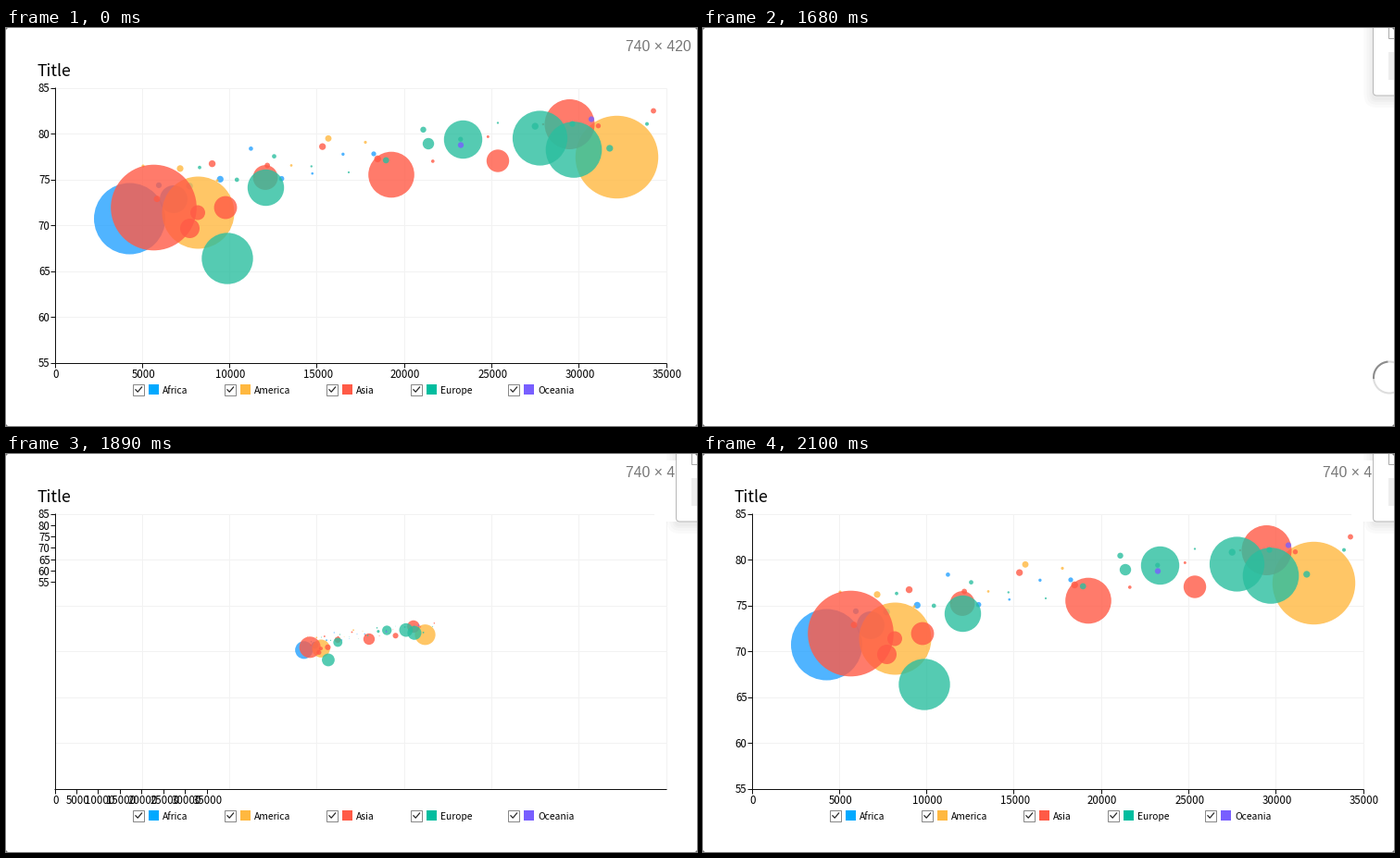
Recreate the animation shown at these times as a matplotlib script. Size 746 px wide and 430 px high, loop 2450 ms.

```python
import math
import random

import matplotlib.pyplot as plt
from matplotlib.animation import FuncAnimation
from matplotlib.patches import Arc, Circle, FancyBboxPatch, Polygon, Rectangle
from matplotlib.transforms import Affine2D

W, H, DPI = 746, 430, 100
STEP, FRAMES = 70, 35
HIDE, RELOAD, SHOW = 1540, 1680, 1890          # ms
GROW_START, GROW_TIME = 1850, 250
LEFT, RIGHT, TOP, BOTTOM = 52.5, 712.5, 64.5, 361.5
MID = (384, 213.7)
FONT = "Noto Sans CJK JP"
PT = 72 / DPI

# name, legend x, swatch, bubble colour, large bubbles (x, y, radius),
# small bubbles (count, first x, last x)
SERIES = [
    ("Africa", 137, "#00a9ff", "#24a1ff",
     [(133.5, 206, 38.5), (181, 185, 15)], (8, 165, 397)),
    ("America", 236, "#ffb840", "#ffb840",
     [(659.5, 139.5, 44.7), (207.5, 199.5, 39)], (7, 148, 388)),
    ("Asia", 346, "#ff5a46", "#ff5a46",
     [(159.5, 194, 46.3), (198.5, 216.5, 10.5), (207, 199.5, 8), (237, 194, 12.4),
      (280, 161.5, 13.4), (416, 158.5, 24.8), (531, 143.5, 12.2), (608.5, 104, 27)],
     (10, 163, 699)),
    ("Europe", 437, "#00bd9f", "#2abe9f",
     [(239, 249, 27.7), (280.5, 172.5, 19.7), (493.5, 120.5, 20.7),
      (576.5, 119, 29.6), (613, 131.5, 30.3), (456, 125, 6.2)], (13, 209, 692)),
    ("Oceania", 542, "#785fff", "#785fff", [], (2, 491, 632)),
]

fig = plt.figure(figsize=(W / DPI, H / DPI), dpi=DPI, facecolor="white")
ax = fig.add_axes([0, 0, 1, 1])
ax.set(xlim=(0, W), ylim=(H, 0))
ax.axis("off")

chart, panel, spinner, cover = [], [], [], []
grow = Affine2D()
rng = random.Random(5)


def line(xs, ys, color, width=1.0, z=2):
    artist, = ax.plot(xs, ys, color=color, lw=width * PT, zorder=z,
                      solid_capstyle="butt")
    chart.append(artist)
    return artist


def text(x, y, label, size, color="black", ha="left", family=FONT, z=4):
    artist = ax.text(x, y, label, fontsize=size * PT, color=color, ha=ha,
                     va="baseline", family=family, zorder=z)
    chart.append(artist)
    return artist


def add(patch, group):
    ax.add_patch(patch)
    group.append(patch)
    return patch


def draw_axes():
    for k in range(1, 8):
        x = LEFT + (RIGHT - LEFT) * k / 7
        line([x, x], [TOP, BOTTOM], "#f2f2f2", z=1)
    for k in range(6):
        y = TOP + (BOTTOM - TOP) * k / 6
        line([LEFT, RIGHT], [y, y], "#f2f2f2", z=1)
    line([LEFT, LEFT], [TOP - .5, BOTTOM + .5], "#111111")
    line([LEFT - .5, RIGHT + .5], [BOTTOM, BOTTOM], "#111111")
    xs = [(k, line([0, 0], [BOTTOM, BOTTOM + 5], "#111111"),
           text(0, 378, str(5000 * k), 11.5, ha="center")) for k in range(8)]
    ys = [(k, line([LEFT - 5, LEFT], [0, 0], "#111111"),
           text(47.6, 0, str(85 - 5 * k), 11.5, ha="right")) for k in range(7)]
    return xs, ys


def small_bubbles(count, first, last):
    """Evenly spread dots scattered about a rising, flattening trend."""
    for k in range(count):
        x = first + (last - first) * k / (count - 1)
        trend = 195 - 85 * math.sqrt((x - 90) / 600)
        yield x, trend + rng.uniform(-20, 20), rng.uniform(1, 3.8)


def draw_series(name, x, swatch, color, large, small):
    for bx, by, r in [*large, *small_bubbles(*small)]:
        bubble = add(Circle((bx, by), r, fc=color, ec="none", alpha=.8, zorder=3), chart)
        bubble.set_transform(grow + ax.transData)
    add(Rectangle((x - .5, 384.5), 12, 12, fc="white", ec="#888888", lw=PT), chart)
    line([x + 2.5, x + 5.2, x + 10], [390.3, 393.2, 387.5], "#222222", 1.2)
    add(Rectangle((x + 17, 385), 11, 11, fc=swatch, ec="none"), chart)
    text(x + 32, 395, name, 10.3)


def draw_panel():
    def box(spread, dy, z, **style):
        shape = FancyBboxPatch((723.5 - spread, -40), 60 + spread, 113 + spread + dy,
                               boxstyle=f"round,pad=0,rounding_size={4 + spread}",
                               zorder=z, **style)
        add(shape, panel)

    for spread in (10, 7, 4, 2):
        box(spread, 3, 5, fc="black", ec="none", alpha=.02)
    # once redrawn, the white page hides the shadow left of the panel
    add(Rectangle((700, 7), 24, 66, fc="white", ec="none", zorder=5.2), cover)
    box(0, 0, 6, fc="white", ec="#b8b8b8", lw=PT)
    add(Rectangle((739.5, -10), 20, 20.5, fc="white", ec="#aaaaaa", lw=PT, zorder=7),
        panel)
    add(Rectangle((739.5, 26), 20, 30, fc="#eeeeee", ec="none", zorder=7), panel)


def draw_spinner():
    add(Circle((741, 377.5), 17, fc="none", ec="#dddddd", lw=2 * PT), spinner)
    return add(Arc((741, 377.5), 34, 34, theta1=-135, theta2=-45, ec="#8c8c8c",
                   lw=2 * PT, zorder=3), spinner)


x_ticks, y_ticks = draw_axes()
text(34, 52.4, "Title", 17.6)
text(669, 25.4, "740 × 420", 15.7, "#777777", family="Liberation Sans", z=5.5)
for series in SERIES:
    draw_series(*series)
draw_panel()
arc = draw_spinner()
for cx, sx in ((0, 1), (W, -1)):
    for cy, sy in ((0, 1), (H, -1)):
        ax.add_patch(Polygon([(cx, cy), (cx + 2 * sx, cy), (cx, cy + 2 * sy)],
                             fc="#777777", ec="none", zorder=8))


def progress(ms):
    if ms < HIDE:
        return 1.0
    n = min(max((ms - GROW_START) / GROW_TIME, 0), 1)
    return math.sin(n * math.pi / 2)


def update(frame):
    ms = frame * STEP
    p = progress(ms)
    for group, visible in ((chart, ms < HIDE or ms >= SHOW),
                           (panel, ms >= RELOAD),
                           (cover, ms >= SHOW),
                           (spinner, RELOAD <= ms < SHOW)):
        for artist in group:
            artist.set_visible(visible)

    grow.clear().translate(-MID[0], -MID[1]).scale(p).translate(*MID)
    for k, tick, label in x_ticks:
        x = LEFT + (RIGHT - LEFT) * p * k / 7
        tick.set_xdata([x, x])
        label.set_x(x + 1.4)
    for k, tick, label in y_ticks:
        y = TOP + (BOTTOM - TOP) * p * k / 6
        tick.set_ydata([y, y])
        label.set_y(y + 4.8)
    arc.theta1 = -135 + .36 * (ms - 1820)
    arc.theta2 = arc.theta1 + 90
    return []


anim = FuncAnimation(fig, update, frames=FRAMES, interval=STEP, repeat=True,
                     repeat_delay=0, init_func=lambda: update(0), blit=False)
plt.show()
```
